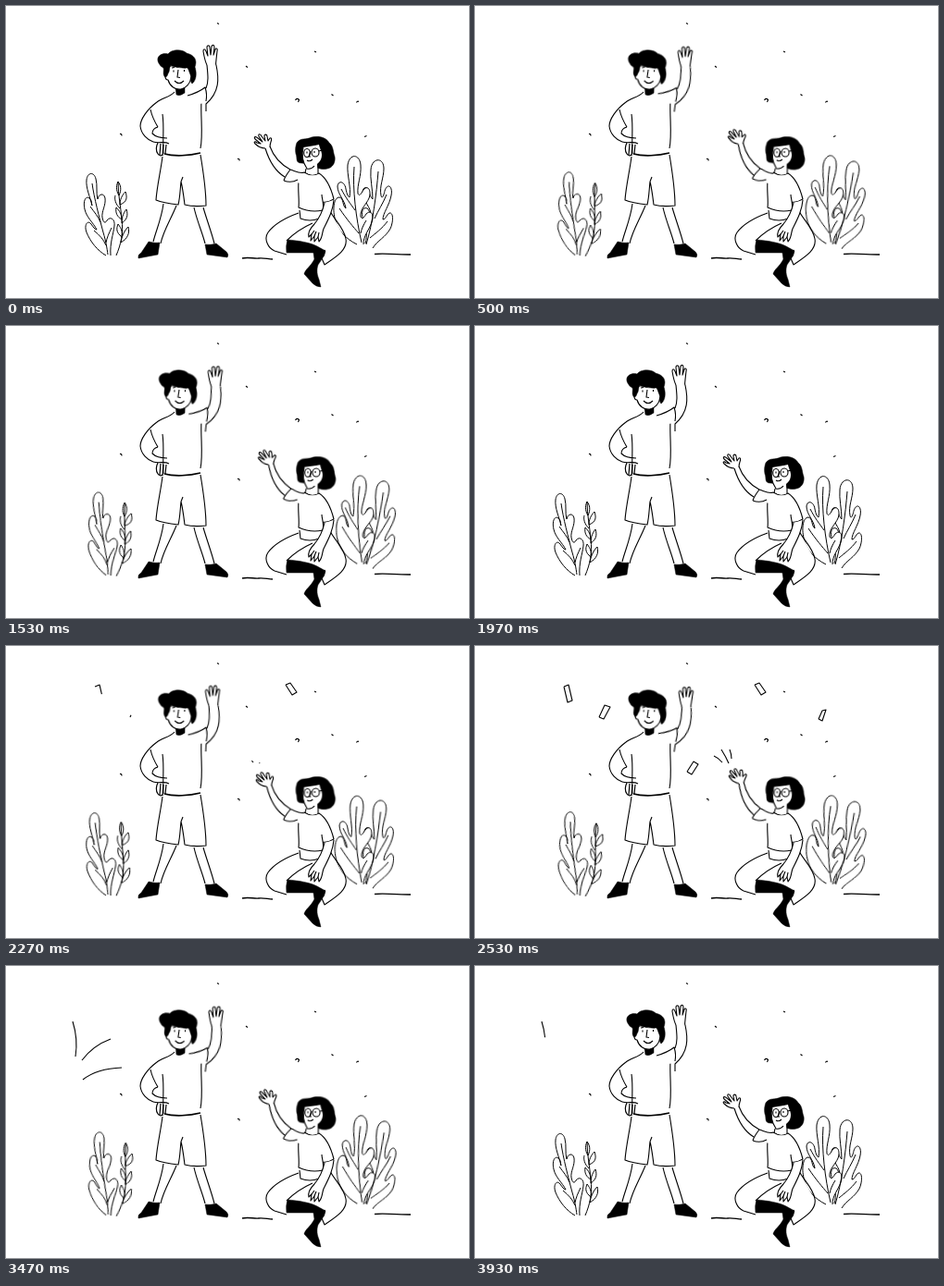
An HTML page without scripts that plays this animation: 500x316 px, repeating every 3960 ms.

```html
<!DOCTYPE html>
<html lang="en">
<head>
<meta charset="utf-8">
<title>Waving friends</title>
<style>
html, body { margin: 0; width: 100%; height: 100%; overflow: hidden; background: #fff; }
svg { display: block; width: 100vw; height: 100vh; }
.ink { fill: none; stroke: #000; stroke-width: 1.1; stroke-linejoin: round; }
.thin { stroke-width: 1; }
.paper { fill: #fff; }
.blank { fill: #fff; stroke: none; }
.solid { fill: #000; stroke-width: .5; }
.sway {
  transform-origin: var(--o);
  animation: sway 990ms cubic-bezier(.37, 0, .63, 1) infinite alternate;
}
@keyframes sway { to { transform: rotate(var(--r)); } }
.trace path {
  stroke-dasharray: 1 3;
  stroke-dashoffset: 1.02;
  animation: trace 3960ms linear var(--d) infinite both;
}
@keyframes trace {
  0% { stroke-dashoffset: 1.02; }
  3.6%, 26.5% { stroke-dashoffset: 0; }
  28%, 100% { stroke-dashoffset: -1.02; }
}
</style>
</head>
<body>
<svg viewBox="0 0 500 316" preserveAspectRatio="none">
<g class="ink">

  <!-- specks and ground -->
  <g>
    <path d="M228 18.5l2 1M259 65l2 1.5M333 49l2 1M351.5 95.5l2 1.5M378.500 104.500q1-2 2.500-1M387 141.500l2.500-1M123 138.500q2-.5 2 2M250 165.500q2.500-.5 2 2M312.500 102q1.500-3 4-.5l-1 2.500"/>
    <path d="M255 273C262 271.500 267 273.500 273 273S283 274 288 274M398 268.500C408 267.500 425 269 437 269" stroke-width="1.3"/>
  </g>

  <!-- left plant -->
  <g class="sway thin" style="--o:112px 272px;--r:12deg">
    <path d="M119 270C124 258 127 246 125 231C124 217 121 205 121 190M121 190C118 196 120 202 122 205C125 199 124 194 121 190M123 215C131 212 131 207 129 201C125 205 123 210 123 215M123 219C118 214 117 209 118 205M125 231C120 228 118 224 119 218C123 222 125 226 125 231M125 235C131 231 132 226 130 220C126 225 125 230 125 235M125 250C119 245 119 241 121 236C125 241 126 245 125 250M124 256C131 252 134 246 132 239C127 244 125 250 124 256"/>
    <path class="paper" d="M108 270C99 265 91 255 87 245C84 237 88 231 92 236C94 239 96 242 98 242C94 234 87 229 85 220C83 211 86 205 90 208C93 210 92 214 93 216C91 207 86 197 87 188C88 180 95 179 97 187C99 194 97 202 99 209C100 203 106 202 107 208C108 216 103 222 104 229C105 234 107 236 109 232C113 227 118 231 117 238C116 247 112 256 113 270"/>
    <path d="M93 192C95 207 101 230 105 245C108 255 109 262 110 269M95 243C101 248 105 252 108 259M114 240C111 246 109 251 108 256M91 217C96 224 99 227 102 234"/>
  </g>

  <!-- right plant -->
  <g class="sway thin" style="--o:388px 262px;--r:9deg">
    <path class="paper" d="M388 257C391 248 388 239 386 232C383 223 385 217 390 219C393 220 392 225 394 227C395 218 385 211 385 202C385 195 391 195 392 200C393 205 394 207 396 209C396 198 393 187 394 177C395 164 408 163 408 176C408 186 403 195 405 205C406 210 408 205 409 200C412 191 418 195 416 205C414 216 407 224 407 231C410 231 411 226 414 224C419 223 418 235 415 241C410 250 401 254 396 262"/>
    <path class="paper" d="M379 258C367 252 359 243 356 233C352 220 354 207 360 207C365 208 363 216 367 219C366 210 358 204 358 195C359 188 366 190 367 198C368 203 369 206 371 207C373 196 368 183 369 172C371 159 382 160 383 172C384 184 379 193 380 203C382 207 384 202 386 199C391 193 395 200 392 208C389 215 382 220 383 228C385 232 387 228 389 225C394 220 398 226 395 234C392 243 386 248 386 258"/>
    <path d="M376 174C374 198 378 230 384 256M402 179C400 204 396 235 389 258M360 219C368 231 375 239 381 246M389 232C386 237 384 241 383 246M412 233C406 241 399 246 393 251M411 204C407 214 402 221 398 230M362 198C367 208 372 214 377 221"/>
  </g>

  <!-- man -->
  <g>
    <path class="blank" d="M181 94L157 110L145 130L158 147L169 150L168 163L162 211L171 214L157 258H168L186 214L188 193L194 214L215 258H226L214 216L210 162L211 104L197 96Z"/>
    <path d="M182 93C178 98 168 100 163 104C152 112 145 123 145 130C146 139 153 145 159 147C165 149 171 146 176 149M156 112C158 121 161 126 164 131M164 131C160 132 158 135 158 138C162 142 168 143 174 143M169 117C171 130 169 146 170 160M211 103C210 120 213 140 210 154"/>
    <path d="M164 148C162 152 162 157 164 160M167 149L166 161M170 150L169 162M173 150L172 160M164 160Q166 163 169 161" stroke-width="1.2"/>
    <path d="M171 160C182 163 198 162 210 159" stroke-width="1.7"/>
    <path d="M169 163C167 179 163 195 162 210C169 213 177 214 186 215C188 207 188 199 189 190C191 198 192 207 193 215C200 217 208 217 216 216C216 198 213 179 210 161M189 190L191 185M170 214C168 230 162 243 159 255M184 216C178 231 170 243 167 257M203 218C206 232 212 245 215 257M213 218C217 232 222 245 225 257"/>
    <path class="solid" d="M154 255Q161 257 166 256L164 269L143 273Q142 269 146 267ZM215 258Q221 259 227 257L238 266Q241 269 239 272L217 269Z"/>
  </g>
  <g class="sway" style="--o:212px 108px;--r:14.500deg">
    <path class="blank" d="M196 97L215 88L218 64H227L230 80L217 105L208 106Z"/>
    <path d="M196 97C203 95 210 92 215 88C217 94 217 98 216 103M217 64C218 74 219 82 216 89M227 64C230 78 231 93 216 106L216 114"/>
    <g class="sway" style="--o:222px 64px;--r:-9deg">
      <path class="paper" d="M217 64C215 60 214 55 213 49C213 46 215 46 216 49L218 54L217 45C217 42 220 42 220 45L221 53L222 44C223 41 225 42 225 45L224 53L226 47C227 45 229 46 228 49L227 58C227 61 226 62 227 64"/>
    </g>
  </g>
  <g class="sway" style="--o:187px 96px;--r:5deg">
    <path class="solid" d="M183 88L193 87V94Q188 98 184 96Z"/>
    <path class="paper" d="M176 65C175 68 175 71 174 72C171 72 171 80 175 80C177 87 183 91 189 90C196 88 199 83 200 77L199 64Z"/>
    <path class="solid" d="M165 62C161 55 168 50 175 52C178 47 190 46 195 51C203 53 207 58 204 66C206 72 206 80 201 84C199 82 199 78 200 76C198 73 198 70 196 67C190 67 182 67 178 64C176 67 177 71 175 73C174 77 172 78 171 76C169 73 171 69 170 67Q167 66 165 62Z"/>
    <path d="M181 69.500v2M192.500 69v2M186 69L185 77L188 77.500M182 81Q187 86 192 81M179 67l3-.5M190 66.500l4 .5"/>
  </g>

  <!-- woman -->
  <g>
    <path class="blank" d="M322 180L316 190V222L290 238L281 250L286 263L303 269L304 254L322 258L345 264L344 280L362 269L368 255L350 222L354 209L346 190L338 182Z"/>
    <path d="M322 180Q330 185 338 181C346 186 351 197 354 209Q348 213 342 212M316 190C315 200 317 210 316 218Q329 224 342 221C344 215 341 209 341 204M317 221L318 230C326 233 333 232 338 230"/>
    <path d="M316 224C302 229 289 237 283 245C278 252 283 262 290 265L303 269M303 254C311 246 322 239 331 235M350 222C355 232 365 240 367 252C369 263 359 270 344 280L341 273C344 270 345 267 344 264"/>
    <path class="solid" d="M304 253C317 254 328 256 336 260L345 265C343 271 340 276 337 280C335 286 336 291 338 296L340 304Q335 304 331 300L322 290C323 285 329 282 333 274L332 267L303 267Q302 259 304 253Z"/>
    <path class="paper" d="M344 213C342 222 338 230 333 236C328 241 326 246 327 250L330 247L329 254L333 249L333 255L337 250L338 255C342 251 341 246 343 241C348 231 353 222 354 210"/>
    <path d="M330 247L333 243M333 249L335 244M337 250L338 245"/>
  </g>
  <g class="sway" style="--o:316px 184px;--r:15deg">
    <path class="blank" d="M285 153L303 176L308 177L320 180L318 192L301 188L288 168L279 154Z"/>
    <path d="M285 152C289 163 296 171 307 177C304 181 301 185 300 189M280 154C284 167 291 179 301 185M300 189Q308 192 315 188M307 177C313 179 318 182 322 180"/>
    <path class="paper" d="M280 154C276 154 272 152 269 149C267 147 269 146 271 148L275 149L269 144C267 141 270 141 272 143L277 147L273 141C272 138 275 138 276 141L280 146L279 141C279 138 282 139 282 141L283 146L285 143C287 142 287 145 286 147Q285 150 285 153"/>
  </g>
  <g class="sway" style="--o:332px 185px;--r:5deg">
    <path class="solid" d="M314 148C318 142 325 145 330 142C337 140 346 142 349 148C354 152 353 158 355 163C356 169 353 175 347 176C340 178 333 174 329 171L319 170C312 170 315 164 313 160C312 155 313 151 314 148Z"/>
    <path class="blank" d="M321 153C327 152 334 151 338 150C339 155 341 157 341 161C341 167 338 169 336 171L337 181Q330 185 324 180L325 176C321 171 319 161 321 153Z"/>
    <path d="M325 176C321 170 319 161 321 153M325 176Q330 177 333 173M324 176L323 181M337 172V181M325 167Q328 169 331 166M329 157L327 163H329"/>
    <ellipse cx="325" cy="159" rx="3.300" ry="4.500"/>
    <ellipse cx="334" cy="158.500" rx="4" ry="4.500"/>
    <path d="M325 157.500v2M333 157v2M338 157L341 156"/>
  </g>

  <!-- confetti and bursts -->
  <g class="trace">
    <path pathLength="1" style="--d:2110ms" d="M302 42L307 40L314 50L309 53Z"/>
    <path pathLength="1" style="--d:2220ms" d="M96 44L101 42L105 59L100 61Z"/>
    <path pathLength="1" style="--d:2260ms" d="M134 77L140 64L146 66L139 79Z"/>
    <path pathLength="1" style="--d:2300ms" d="M229 136L236 125L241 128L234 139Z"/>
    <path pathLength="1" style="--d:2340ms" d="M371 79L375 70L379 69L375 81Z"/>
    <path pathLength="1" style="--d:2240ms" d="M267 126Q263 121 258 119"/>
    <path pathLength="1" style="--d:2260ms" d="M274 127Q271 120 266 112"/>
    <path pathLength="1" style="--d:2280ms" d="M277 122Q277 117 275 112"/>
    <path pathLength="1" style="--d:2700ms" d="M82 102Q94 86 113 79"/>
    <path pathLength="1" style="--d:2700ms" d="M83 123Q98 111 125 110"/>
    <path pathLength="1" style="--d:2850ms" d="M75 98Q78 79 72 60"/>
  </g>
</g>
</svg>
</body>
</html>
```
